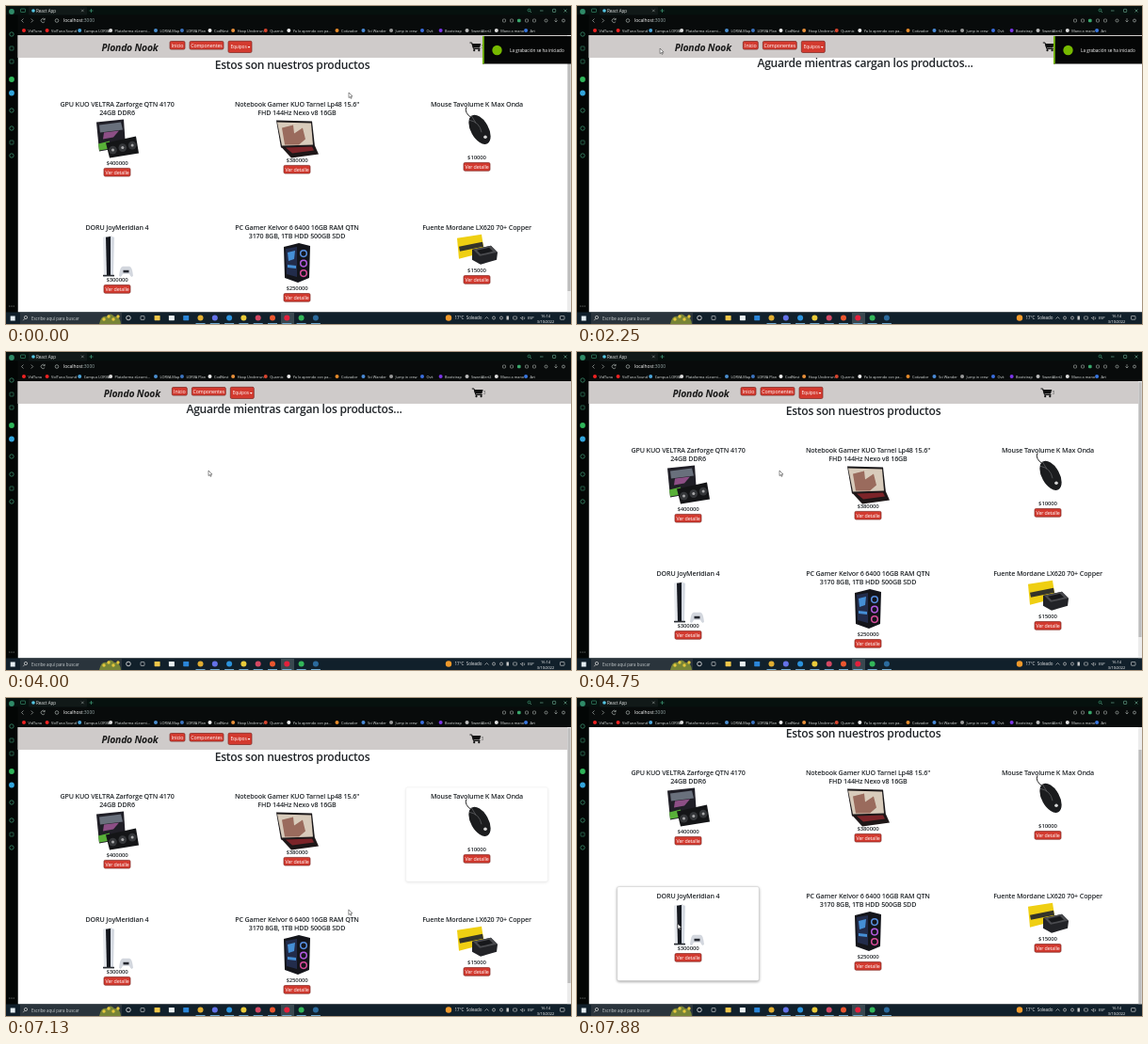
These frames come from a looping animation (600 by 338 pixels, 8000 ms). An HTML page:

```html
<!DOCTYPE html>
<html lang="es">
<head>
<meta charset="utf-8">
<title>Tienda</title>
<style>
  html, body { margin: 0; width: 100%; height: 100%; overflow: hidden; background: #000; }
  svg { display: block; width: 600px; height: 338px; font-family: "Open Sans", "Noto Sans", sans-serif; }
  .page text { letter-spacing: -.02em; }
  .glow { filter: drop-shadow(0 1px 1.6px rgba(0, 0, 0, .4)); }
</style>
</head>
<body>
<svg id="stage" viewBox="0 0 600 338"></svg>
<script>
const LOOP = 8000, RELOAD = 1880, LOADED = 4120, FADE = 200;
const INK = '#212529', GREY = '#a9b0ae', GREEN = '#3f9c78';

const rect = (x, y, w, h, fill, more = '') =>
  `<rect x="${x}" y="${y}" width="${w}" height="${h}" fill="${fill}" ${more}/>`;
const frame = (x, y, w, h, color) => rect(x, y, w, h, 'none', `rx=".6" stroke="${color}" stroke-width=".6"`);
const dot = (x, y, r, fill, more = '') => `<circle cx="${x}" cy="${y}" r="${r}" fill="${fill}" ${more}/>`;
const ring = (x, y, r, color, width = .7) => dot(x, y, r, 'none', `stroke="${color}" stroke-width="${width}"`);
const shape = (d, fill) => `<path d="${d}" fill="${fill}"/>`;
const line = (d, color, width = .7) => `<path d="${d}" fill="none" stroke="${color}" stroke-width="${width}"/>`;
const text = (x, y, size, value, fill = '#fff', more = '') =>
  `<text x="${x}" y="${y}" font-size="${size}" fill="${fill}" ${more}>${value}</text>`;
const centered = (x, y, size, value, fill = INK, weight = 600) =>
  text(x, y, size, value, fill, `text-anchor="middle" font-weight="${weight}"`);
const button = (x, y, w, h, label, size = 5.3) =>
  rect(x, y, w, h, '#d33a2f', 'rx="1.4" stroke="#7c2420" stroke-width=".7"') +
  centered(x + w / 2, y + h / 2 + size * .36, size, label, '#fff', 400);
const repeat = (n, draw) => Array.from({ length: n }, (_, i) => draw(i)).join('');

// Pictures, drawn around their top centre
const gpu = shape('M-22 2L7 -1 9 28-19 33z', '#201f27') + shape('M-19 5L4 2 6 10-18 13z', '#69707c') +
  shape('M-14 13L2 11-4 18-15 20z', '#8d4f86') + shape('M-20 25L-8 22-7 30-19 32z', '#58b038') +
  shape('M-12 24L20 17 23 35-8 40z', '#141517') +
  repeat(3, i => dot(-4.5 + 10.3 * i, 31.5 - 2.5 * i, 4.3, '#35373a') + dot(-4.5 + 10.3 * i, 31.5 - 2.5 * i, 1.5, '#a9a9ab'));
const laptop = shape('M-22 0L16 1 19 28-17 29z', '#1c191b') + shape('M-21 2L15 3 17 26-16 27z', '#d8cbbb') +
  shape('M-16 8L-4 5-3 14 6 8 9 20 2 26-13 26z', '#9a6b5d') + shape('M-17 28L19 27 23 36-6 40z', '#1e1718') +
  shape('M-12 29L16 28 18 32-5 35z', '#7c2429');
const mouse = line('M-11 -5q-3 6 6 12', '#222', 1) +
  '<ellipse cx="3" cy="19" rx="9.4" ry="17" fill="#1b1c1e" transform="rotate(-29 3 19)"/>' +
  line('M-8 9q11 2 13 13M-6 4l5 8', '#66686b') + dot(9, 27, 1.8, '#d8d8d8');
const consoleBox = shape('M-15 3l4-1 1 42-4 2z', '#e4e7ec') + shape('M-12 3l6-1v42h-5z', '#15181f') +
  shape('M-7 2l4 1-1 42-3-2z', '#d5dae2') + rect(-15, 43, 12, 1.6, '#2a2d33') +
  shape('M2 44q1-10 4-10h7q3 0 4 10-2 3-4-2h-7q-2 5-4 2', '#d3d7de') + rect(6.5, 38, 6, 2.6, '#24272e');
const tower = shape('M-14 4L2 0 14 3 13 37 1 42-13 37z', '#14151b') + shape('M-12 6L0 4V36L-11 33z', '#222c4b') +
  shape('M-10 10l8-2-1 9-6 2zM-10 23l9 1v3l-9-1z', '#458fd6') +
  ['#588fe0', '#b35be0', '#d74b9a'].map((color, i) => ring(7, 11 + 10.5 * i, 3.3, color, 1.5)).join('');
const powerUnit = shape('M-21 4L5 0 8 19-19 26z', '#efcf12') + shape('M-19 13L6 8 7 13-18 18z', '#34342a') +
  shape('M-5 16l20-4 7 7-1 8-17 5-9-5z', '#222327') + shape('M-4 16l19-4 6 7-18 4z', '#4a4b4f') +
  shape('M0 17l13-3 4 4-13 3z', '#17181b');

// Title lines, price, picture and its height
const cards = [
  [['GPU KUO VELTRA Zarforge QTN 4170', '24GB DDR6'], 400000, gpu, 40],
  [['Notebook Gamer KUO Tarnel Lp48 15.6"', 'FHD 144Hz Nexo v8 16GB'], 380000, laptop, 37],
  [['Mouse Tavolume K Max Onda'], 10000, mouse, 43.5],
  [['DORU JoyMeridian 4'], 300000, consoleBox, 43],
  [['PC Gamer Kelvor 6 6400 16GB RAM QTN', '3170 8GB, 1TB HDD 500GB SDD'], 250000, tower, 42.7],
  [['Fuente Mordane LX620 70+ Copper'], 15000, powerUnit, 33],
];
const cardX = i => 118 + 191 * (i % 3);
const cardY = i => 95 + 130.5 * Math.floor(i / 3);

const productCard = ([lines, price, picture, height], i) => {
  const pictureY = 15 + 9.3 * lines.length, priceY = pictureY + height;
  return `<g transform="translate(${cardX(i)} ${cardY(i)})">` +
    rect(-75.3, 0, 150.6, 100, '#fff', 'class="glow" rx="2" stroke="#bbb" stroke-width=".4" opacity="0"') +
    lines.map((value, n) => centered(0, 12 + n * 9.3, 7.15, value)).join('') +
    `<g transform="translate(0 ${pictureY - 7})">${picture}</g>` +
    centered(0, priceY, 6, '$' + price) + button(-14, priceY + 3.8, 28, 8.6, 'Ver detalle') + '</g>';
};

const header = rect(0, 31, 600, 24, '#cfcbca') + '<g id="nav">' +
  text(101.5, 47.6, 10.4, 'Plondo Nook', '#1b1b1b', 'font-weight="700" font-style="italic"') +
  button(174, 37.5, 16, 8.6, 'Inicio') + button(195, 37.5, 36, 8.6, 'Componentes') +
  button(236, 37.3, 25, 12.2, 'Equipos&#8196;&#8196;', 4.8) + shape('M256.6 43h2.8l-1.4 1.7z', '#fff') +
  line('M492.5 39h2.2l1.8 6.5h7', '#111', 1) + shape('M494.5 40h9.8l-1.3 4.5h-7z', '#111') +
  dot(497.2, 47.2, 1.1, '#111') + dot(502.3, 47.2, 1.1, '#111') + text(504.4, 45, 4.8, '3', '#555') + '</g>';

const page = `<clipPath id="view"><rect x="12.5" y="31" width="587.5" height="294.5"/></clipPath>
  <g clip-path="url(#view)" class="page">${rect(12.5, 31, 588, 295, '#fff')}
  <g id="scroller">${header}
    <g id="loading">${centered(306, 65.3, 12.1, 'Aguarde mientras cargan los productos...')}</g>
    <g id="products">${centered(304, 67, 12.1, 'Estos son nuestros productos')}${cards.map(productCard).join('')}</g>
  </g>
  <g id="scrollbar">${rect(596, 31, 4, 295, '#ececec')}${rect(596.4, 32, 3.2, 271, '#bdbdbd', 'id="thumb"')}</g></g>`;

const bookmarks = [
  ['#e22', 'VidTuna'], ['#e22', 'VidTuna Sound'], ['#4aa3d8', 'Campus LORVA'], ['#ddd', 'Plataforma eLearni...'],
  ['#4b8fd0', 'LORVA Map'], ['#3c74c0', 'LORVA Plan'], ['#eee', 'CodNest'], ['#e8903a', 'Heap Underrun'],
  ['#d8452f', 'Quarnix'], ['#eee', 'Ya lo aprendo con pa...'], ['#e58a2a', 'Cotizador'], ['#4a8bd6', 'Sci Wander'],
  ['#999', 'Jump in crew'], ['#3b6fe0', 'Ovit'], ['#7b35e8', 'Bootstrap'], ['#bbb', 'SweetAlert2'],
  ['#ddd', 'Mano a mano'], ['#3977e0', 'Art'],
];
let bookmarkX = 19;
const bookmarkBar = bookmarks.map(([color, label]) => {
  const x = bookmarkX;
  bookmarkX += 13 + 1.66 * label.length;
  return dot(x, 26, 2, color) + text(x + 4.5, 27.5, 3.85, label, '#dfe3e2');
}).join('');

const sidebar = rect(0, 9.5, 12.5, 316, '#030605') + dot(6, 6, 2.9, '#2f8b68') +
  [30, 111, 130, 159].map(y => ring(6, y, 2.2, GREEN)).join('') + [45, 59, 145].map(y => frame(4, y - 2, 4, 4, GREEN)).join('') +
  dot(6, 78, 2.9, '#2fb559') + dot(6, 92.5, 2.9, '#32a5dc') + repeat(3, i => dot(3.8 + 2.2 * i, 319, .5, GREY));

const chrome = rect(0, 0, 600, 338, '#080b0b') + rect(0, 0, 600, 9.5, '#06110e') +
  rect(24, .8, 62, 8.7, '#111918', 'rx="1"') + frame(15.5, 3, 5, 3.5, GREEN) +
  dot(29, 5, 1.8, '#55c8e5') + text(32, 6.6, 4.5, 'React App', '#e5e8e7') +
  line('M80 3.6l2.6 2.6m0-2.6l-2.6 2.6', GREY, .5) + line('M88.5 5h4m-2-2v4', GREEN) +
  ring(555.5, 4.5, 1.4, GREEN) + line('M556.5 5.5l1.5 1.5M567 5h3.5M592.5 3.5l3 3m0-3l-3 3', '#74b59b', .6) +
  frame(580.5, 3.3, 3.2, 3.2, '#74b59b') +
  line('M18.5 13.5l-2 2 2 2m8.2-4l2 2-2 2M41 14.2a2.1 2.1 0 1 0 .2 2.2m0-3.5v1.7h-1.8', GREY) +
  ring(54, 15.5, 1.8, GREY) + text(61, 17.3, 4.9, 'localhost<tspan fill="#9aa">:3000</tspan>') +
  repeat(5, i => i === 2 ? rect(543, 13.7, 3.6, 3.6, '#38a86c', 'rx="1"') : frame(527.5 + 8 * i, 14, 3, 3, GREY)) +
  repeat(2, i => ring(573.5 + 18.5 * i, 15.5, 1.5, GREY)) + line('M584 13v4m-1.6-1.6l1.6 1.6 1.6-1.6', GREY, .6) +
  bookmarkBar + sidebar;

const apps = ['#f0c64a', '#e8eef0', '#2b86d9', '#e0ad32', '#6472e8', '#2b92dc', '#ebcb3a', '#d34863', '#e9562f',
  '#e3203c', '#33b65a', '#2b6a9c'];
const taskbar = rect(0, 325.5, 600, 12.5, '#11202b') + rect(4.7, 329.5, 5, 5, '#e4eef4') +
  rect(15, 326, 108, 12, '#2a343c') + ring(21, 331, 1.6, '#ddd') + line('M19.8 332.4l-1.6 1.8', '#ddd') +
  text(27, 333.5, 4.45, 'Escribe aquí para buscar', '#c8cdcf') +
  shape('M99 338q2-10 8-8 4-5 8 0 6-1 7 8z', '#778437') + repeat(4, i => dot(104 + 5 * i, 333 - 3 * (i % 2), 1.7, '#e5c83c')) +
  ring(130, 331.5, 2.3, '#eee', .8) + frame(143, 329.5, 4, 4, '#ddd') + rect(292, 325.5, 14, 12.5, '#394850') +
  apps.map((color, i) => {
    const x = 160.6 + 15.3 * i;
    return i < 3 ? rect(x - 3, 329, 6, 5.2, color, 'rx=".6"') : dot(x, 331.5, 3, color) + rect(x - 5, 337, 10, 1, '#6fa9cf');
  }).join('') +
  dot(470, 331.5, 3.2, '#f19a2b') + text(476.5, 333.3, 4.5, '17°C&#160; Soleado', '#eee') +
  line('M508.5 332.5l2-2 2 2', '#ddd', .6) + repeat(2, i => ring(518 + 8 * i, 331.5, 1.5, '#ccc')) +
  rect(531.5, 329.5, 2.4, 4, '#ccc') + frame(538.5, 330, 4, 3, '#ccc') +
  line('M546 331.5h1.2l1.5-1.5v3.5l-1.5-1.5m3-1.5q1 1.2 0 2.5', '#ccc', .6) + text(554, 333.2, 3.8, 'ESP') +
  centered(573, 330.6, 3.9, '16:14', '#fff', 400) + centered(573, 336.6, 3.9, '3/10/2022', '#fff', 400) +
  frame(588.5, 329.5, 4.5, 3.8, '#ddd');

const toast = '<g id="toast">' + rect(506, 32, 94, 29.5, '#050606') + rect(506, 32, 1.8, 29.5, '#76b900') +
  dot(521.5, 47, 5.2, '#76b900') + text(535, 49, 4.6, 'La grabación se ha iniciado') + '</g>';
const cursor = '<path id="cursor" d="M0 0v5.6l1.3-1.2.9 2 .9-.4-.9-1.9h1.8z" fill="#fff" stroke="#222" stroke-width=".5"/>';

const stage = document.getElementById('stage');
stage.innerHTML = chrome + page + taskbar + toast + cursor;
const part = Object.fromEntries([...stage.querySelectorAll('[id]')].map(node => [node.id, node]));
const glows = [...stage.querySelectorAll('.glow')];

const ramp = (t, from, to) => Math.min(1, Math.max(0, (t - from) / (to - from)));
const smooth = p => p * p * (3 - 2 * p);
const move = (node, x, y) => node.setAttribute('transform', `translate(${x} ${y})`);
const show = (node, on) => node.setAttribute('display', on ? 'inline' : 'none');

// Pointer moves: start, end, target x, target y
const moves = [
  [150, 1300, 38, 13], [1900, 2900, 215, 126], [4850, 5300, 120, 132],
  [5300, 6710, 500, 128], [6710, 7300, 330, 249], [7550, 7800, 107, 240],
];
const pointer = t => moves.reduce(([x, y], [from, to, toX, toY]) => {
  const p = smooth(ramp(t, from, to));
  return [x + (toX - x) * p, y + (toY - y) * p];
}, [364, 92]);

const scrollAt = t => 25 * (1 - (1 - ramp(t, 7150, 7600)) ** 2);

const isOver = (i, t) => {
  const [x, y] = pointer(t);
  return Math.abs(x - cardX(i)) < 75 && Math.abs(y + scrollAt(t) - cardY(i) - 50) < 50;
};
// Share of the last FADE ms that the pointer spent over the card
const glowAt = (i, t) => {
  const samples = 20;
  let hits = 0;
  for (let n = 0; n < samples; n++) hits += isOver(i, t - FADE * n / samples);
  return hits / samples;
};

function draw(t) {
  const loading = t >= RELOAD && t < LOADED, scroll = scrollAt(t);
  move(part.cursor, ...pointer(t));
  show(part.loading, loading);
  show(part.products, !loading);
  show(part.scrollbar, !loading);
  move(part.nav, loading ? 2.3 : 0, 0);
  move(part.scroller, 0, -scroll);
  move(part.thumb, 0, scroll * .92);
  move(part.toast, 96 * ramp(t, 3300, 3750) ** 2, 0);
  glows.forEach((glow, i) => glow.setAttribute('opacity', glowAt(i, t)));
}

function tick() {
  draw(performance.now() % LOOP);
  requestAnimationFrame(tick);
}
tick();
</script>
</body>
</html>
```
